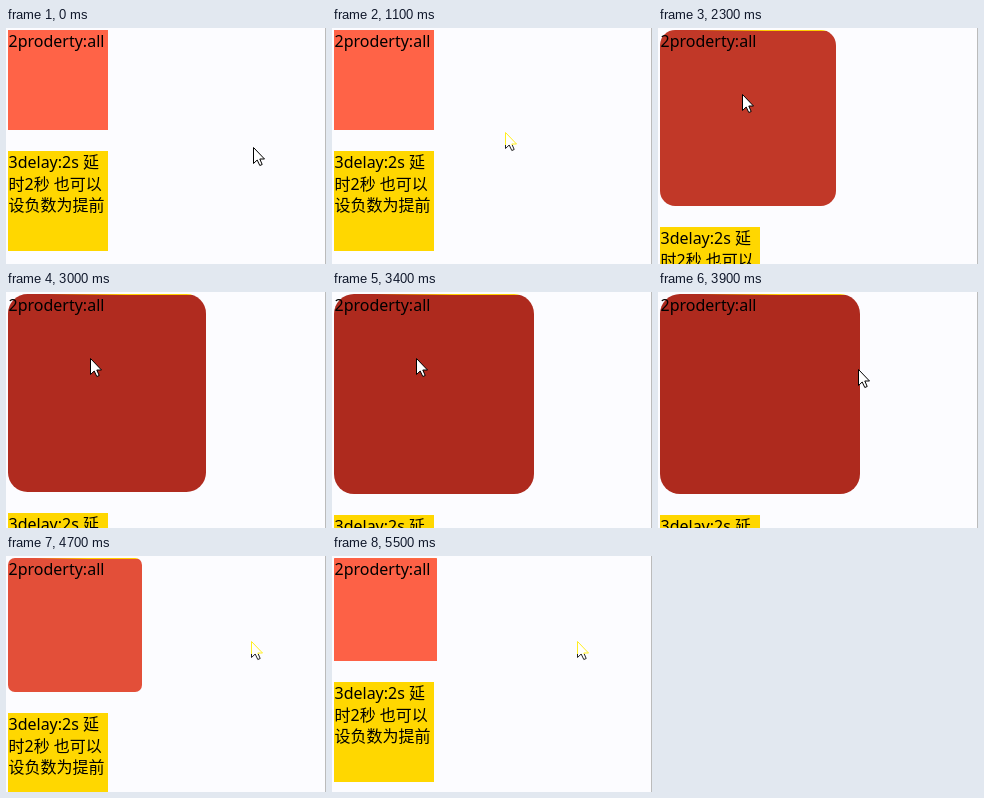
An HTML page that plays this animation: 320x236 px, repeating every 5600 ms.

```html
<!DOCTYPE html>
<html lang="zh">
<head>
<meta charset="utf-8">
<style>
  html, body { margin: 0; width: 100%; height: 100%; overflow: hidden; background: #fcfcff; }
  #stage {
    position: relative; width: 320px; height: 236px; overflow: hidden;
    font: 16px/21.33px "Noto Sans", "Noto Sans CJK SC", "Noto Sans CJK", sans-serif;
    color: #000; white-space: nowrap;
  }
  .box {
    position: absolute; left: 2px; top: 2px; width: 100px; height: 100px;
    box-sizing: border-box; padding: 1px 0 0 .5px;
  }
  #grow { background: #ff6347 linear-gradient(90deg, transparent 20%, var(--rim) 60%) 0 0 / 100% 1px no-repeat; }
  #delay { background: #ffd700; }
  #edge { position: absolute; right: 0; top: 0; width: 1px; height: 100%; background: #bbb; }
  #cursor { position: absolute; left: -1px; top: 0; overflow: visible; }
</style>
</head>
<body>
<div id="stage">
  <div id="grow" class="box">2proderty:all</div>
  <div id="delay" class="box">3delay:2s 延<br>时2秒 也可以<br>设负数为提前</div>
  <div id="edge"></div>
  <svg id="cursor" width="13" height="20">
    <defs>
      <linearGradient id="tint" x1="0" y1="0" x2="0" y2="1">
        <stop offset=".68" stop-color="#ffee20"/>
        <stop offset=".72" stop-color="#222"/>
      </linearGradient>
    </defs>
    <path id="arrow" d="M.5 .5V16.5L4.2 13L6.8 18.5L9.2 17.5L6.8 12H11.5Z" fill="#fff"/>
  </svg>
</div>
<script>
  const LOOP = 5600, STEP = 100;
  const HOVER = { enter: 1380, leave: 3937, duration: 2000 };
  const APPROACH = { start: 740, duration: 770 };
  const RETREAT = { start: 3580, duration: 490 };
  const HOME = [248, 119], OVER = [85, 66], AWAY = [246, 85];
  const TOMATO = [255, 99, 71], BRICK = [174, 42, 30];

  const el = id => document.getElementById(id);
  const grow = el("grow"), delay = el("delay"), cursor = el("cursor"), arrow = el("arrow");
  const clamp = v => Math.min(1, Math.max(0, v));
  const mix = (a, b, k) => a + (b - a) * k;
  const bezier = (a, b, u) => 3 * a * u * (1 - u) ** 2 + 3 * b * u * u * (1 - u) + u ** 3;

  // cubic-bezier(.25, .1, .25, 1), solved by bisection
  function ease(x) {
    x = clamp(x);
    let lo = 0, hi = 1;
    for (let i = 0; i < 24; i++) {
      const mid = (lo + hi) / 2;
      if (bezier(.25, .25, mid) <= x) lo = mid; else hi = mid;
    }
    return x ? bezier(.1, 1, lo) : 0;
  }

  // Vertical travel lags behind horizontal, which bends the path.
  function glide(from, to, move, t) {
    const x = clamp((t - move.start) / move.duration);
    const k = x * x * (3 - 2 * x);
    return [mix(from[0], to[0], k), mix(from[1], to[1], k ** 1.6)].map(Math.round);
  }

  function draw(t) {
    const { enter, leave, duration } = HOVER;
    const p = ease((t - enter) / duration) - ease((t - leave) / duration);
    const size = Math.round(100 + 100 * p);
    grow.style.width = grow.style.height = size + "px";
    grow.style.borderRadius = 20 * p + "px";
    grow.style.backgroundColor = `rgb(${TOMATO.map((c, i) => Math.round(mix(c, BRICK[i], p)))})`;
    grow.style.setProperty("--rim", `rgba(255, 205, 0, ${clamp(3 * p)})`);
    delay.style.top = size + 23.33 + "px";

    const [x, y] = t < RETREAT.start
      ? glide(HOME, OVER, APPROACH, t)
      : glide(OVER, AWAY, RETREAT, t);
    cursor.style.transform = `translate(${x}px, ${y}px)`;
    const tinted = t > APPROACH.start && p < .5;
    arrow.setAttribute("stroke", tinted ? "url(#tint)" : "#000");
  }

  const origin = performance.now();
  function frame() {
    const t = (performance.now() - origin) % LOOP;
    draw(Math.floor(t / STEP) * STEP);
    requestAnimationFrame(frame);
  }
  frame();
</script>
</body>
</html>
```
